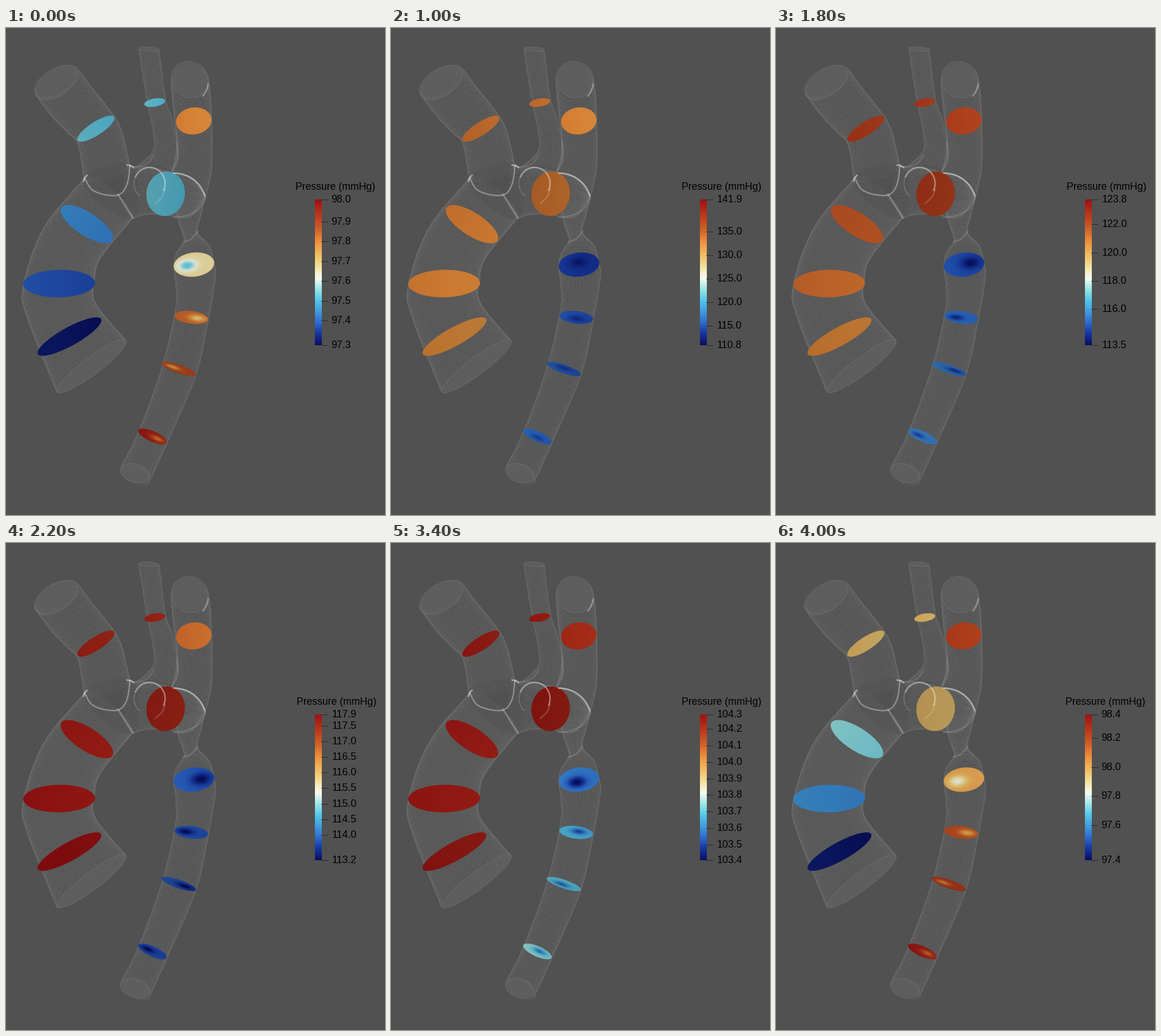
Write a matplotlib script that moves like this. It is 660x849 px and loops after 4200 ms.

```python
import math
import numpy as np
import matplotlib.pyplot as plt
from matplotlib.animation import FuncAnimation
from matplotlib.colors import LinearSegmentedColormap
from matplotlib.patches import Ellipse

W, H, DPI = 660, 849, 100
FRAMES, INTERVAL = 21, 200
PX = 72 / DPI
GREY = 82
BAR_TOP, BAR_BOTTOM = 299, 553
rng = np.random.default_rng(4)

bar_map = LinearSegmentedColormap.from_list("bar", [
    (0, "#080f64"), (.09, "#193ca5"), (.15, "#2d69cd"), (.23, "#419bdc"),
    (.31, "#55c8eb"), (.385, "#9be6e4"), (.457, "#f5faf5"), (.5, "#f5f0c8"),
    (.575, "#f0d27d"), (.71, "#ee913c"), (.8, "#cd5f28"), (.9, "#b9371b"),
    (1, "#a01014")], 512)


class Curve:
    """Value over time through a few (frame, value) points."""

    def __init__(self, *points):
        self.times, self.values = zip(*points)

    def __call__(self, n):
        return np.interp(n, self.times, self.values)


low_pressure = Curve((0, 97.275), (3, 107.94), (7, 113.74), (11, 113.19),
                     (14, 108.755), (17, 103.406), (20, 97.36))
high_pressure = Curve((0, 98.013), (3, 141.86), (4, 148), (7, 129.66), (11, 117.86),
                      (14, 110.53), (17, 104.287), (20, 98.362))

# Pressure within the current range, 0 to 1, at five sites of the vessel
root = Curve((0, .02), (3, .98), (7, .42), (11, 1), (14, .9), (17, .97), (20, .02))
arch = Curve((0, .33), (3, .68), (11, .94), (17, .96), (20, .6))
branch = Curve((0, .71), (3, .46), (7, .96), (11, .76), (14, .97), (20, .87))
narrow = Curve((0, .54), (3, .06), (17, .19), (20, .66))
outlet = Curve((0, .96), (3, .02), (7, .3), (11, .12), (17, .38), (20, .97))

upstroke = Curve((0, 0), (1, 2.2), (3, 3), (20, 20))
swirl = Curve((0, .22), (3, .03), (14, .18), (20, .2))

# Slices: centre, half axes, angle, the two sites they lie between, fraction
SLICES = [(110.5, 538, 63, 16, -29, root, arch, 0), (92.5, 445.5, 62.5, 24, -1, root, arch, .33),
          (141, 342, 53, 20, 33, root, arch, .6), (156.5, 175.5, 38, 11.5, -33, arch, arch, 0),
          (259, 130, 18.5, 7, -10, arch, arch, 0), (278, 289, 33.5, 39, 8, arch, arch, 0),
          (327, 162, 31, 23.5, -8, branch, branch, 0), (327.3, 412.5, 35.5, 21, -7, narrow, outlet, 0),
          (322.5, 504.5, 29.5, 11, 7, narrow, outlet, .55), (301, 594.5, 31.5, 7.5, 19, narrow, outlet, .75),
          (255, 712, 27, 9, 24, narrow, outlet, 1)]


def smooth(points, n):
    """Catmull-Rom curve, sampled evenly along its length."""
    p = np.array(points, float)
    p = np.vstack([2 * p[0] - p[1], p, 2 * p[-1] - p[-2]])
    t = np.linspace(0, 1, 30)[:, None]
    parts = []
    for a, b, c, d in zip(p, p[1:], p[2:], p[3:]):
        parts.append(.5 * (2 * b + (c - a) * t + (2 * a - 5 * b + 4 * c - d) * t**2
                           + (3 * b - a - 3 * c + d) * t**3))
    q = np.vstack(parts)
    s = np.r_[0, np.cumsum(np.hypot(*np.diff(q, axis=0).T))]
    at = np.linspace(0, s[-1], n)
    return np.c_[np.interp(at, s, q[:, 0]), np.interp(at, s, q[:, 1])]


def arc(cx, cy, a, b, start, end):
    t = np.radians(np.linspace(start, end, 60))
    return np.c_[cx + a * np.cos(t), cy + b * np.sin(t)]


glow = np.zeros((H, W))


def splat(a, b, strength):
    """Add the straight lines a-b to the glow image."""
    t = (np.arange(8) + .5)[:, None, None] / 8
    p = (a + (b - a) * t).reshape(-1, 2) - .5
    weight = np.tile(np.hypot(*(b - a).T) / 8 * strength, 8)
    cell = np.floor(p).astype(int)
    f = p - cell
    for dx in (0, 1):
        for dy in (0, 1):
            part = weight * abs(1 - dx - f[:, 0]) * abs(1 - dy - f[:, 1])
            np.add.at(glow, (np.clip(cell[:, 1] + dy, 0, H - 1),
                             np.clip(cell[:, 0] + dx, 0, W - 1)), part)


def tube(left, right, tilt0, tilt1, step=4.6):
    """Triangle mesh around a round vessel between two side curves."""
    length = np.hypot(*np.diff(smooth(left, 60), axis=0).T).sum()
    n = int(length / step)
    lo, hi = smooth(left, n), smooth(right, n)
    mid, half = (lo + hi) / 2, (hi - lo) / 2
    m = int(2 * math.pi * np.hypot(*half.T).mean() / step)
    angle = 2 * math.pi * (np.arange(m) + .5 * (np.arange(n)[:, None] % 2)) / m
    angle = (angle + rng.normal(0, .8 / m, (n, m)))[..., None]
    side = np.c_[-half[:, 1], half[:, 0]] * np.linspace(tilt0, tilt1, n)[:, None]
    v = mid[:, None] + half[:, None] * np.cos(angle) + side[:, None] * np.sin(angle)
    v += rng.normal(0, .3, v.shape)
    ahead = np.roll(v, -1, axis=1)
    odd = (np.arange(n - 1) % 2 == 1)[:, None, None]
    diagonal = np.where(odd, ahead[:-1], v[:-1])
    other = np.where(odd, v[1:], ahead[1:])
    for a, b in ((v, ahead), (v[:-1], v[1:]), (diagonal, other)):
        splat(a.reshape(-1, 2), b.reshape(-1, 2), 4.2)
    for edge in (lo, hi):
        splat(edge[:-1], edge[1:], 9)


def cap(cx, cy, a, b, degrees):
    """Open vessel end: lighter ellipse with a rim."""
    c, s = math.cos(math.radians(degrees)), math.sin(math.radians(degrees))
    rim = arc(0, 0, a, b, 0, 360) @ np.array([[c, s], [-s, c]]) + (cx, cy)
    splat(rim[:-1], rim[1:], 22)
    yy, xx = np.mgrid[:H, :W] + .5
    u = ((xx - cx) * c + (yy - cy) * s) / a
    v = ((yy - cy) * c - (xx - cx) * s) / b
    glow[u * u + v * v < 1] += 10


# Left branch, thin branch, right branch
tube([(50, 113), (75, 148), (105, 180), (125, 202), (136, 262)],
     [(125, 71), (150, 105), (176, 137), (200, 175), (216, 240)], .5, .3)
tube([(231, 37), (245, 125), (256, 180), (256, 215), (226, 245)],
     [(267, 39), (278, 125), (290, 160), (300, 215), (289, 250)], .2, .3)
tube([(287, 90), (290, 120), (298, 200), (290, 250)],
     [(353, 95), (357, 140), (358, 240), (348, 292)], .9, .3)
# Ascending part, arch, descending part
tube([(136, 262), (65, 350), (30, 450), (37, 505), (88, 634)],
     [(220, 332), (165, 400), (154, 440), (156, 480), (209, 545)], .3, .22)
tube([(216, 241), (250, 243), (290, 252), (320, 260), (347, 290)],
     [(220, 332), (245, 325), (280, 326), (318, 330), (347, 296)], .3, .3)
tube([(290, 292), (299, 332), (310, 366), (308, 376), (296, 394), (292, 415), (296, 450),
      (295, 490), (272, 590), (230, 705), (200, 765)],
     [(347, 293), (340, 325), (333, 350), (336, 362), (355, 382), (362, 410), (365, 435),
      (352, 512), (331, 605), (280, 725), (249, 793)], .3, .5)
cap(87.5, 95, 42, 23, -33)
cap(249, 37, 18, 4, 4)
cap(320, 90, 33, 31, 35)
cap(148.5, 589.5, 75, 15, -37)
cap(224.5, 776, 26, 16, 18)

fig = plt.figure(figsize=(W / DPI, H / DPI), dpi=DPI, facecolor="#525252")
ax = fig.add_axes([0, 0, 1, 1])
ax.axis("off")
mesh = (GREY + 42 * (1 - np.exp(-glow / 42))) / 255
ax.imshow(mesh, cmap="gray", vmin=0, vmax=1, extent=(0, W, H, 0),
          interpolation="nearest", aspect="auto", zorder=0)


class Slice:
    """Coloured cross section of a vessel."""

    def __init__(self, index, cx, cy, a, b, degrees, near, far, fraction):
        self.index, self.near, self.far, self.fraction = index, near, far, fraction
        c, s = math.cos(math.radians(degrees)), math.sin(math.radians(degrees))
        hw, hh = math.hypot(a * c, b * s) + 1, math.hypot(a * s, b * c) + 1
        ys, xs = np.mgrid[-1:1:90j, -1:1:90j]
        self.u = (xs * hw * c + ys * hh * s) / a
        self.v = (ys * hh * c - xs * hw * s) / b
        # a slice seen edge-on gets less light, one standing upright even less
        shade = min(.9, .66 + .5 * b / a) * (.84 if b > a else 1)
        colours = bar_map(np.linspace(0, 1, 512))[:, :3] * shade
        cmap = LinearSegmentedColormap.from_list("slice", colours, 512)
        self.image = ax.imshow(xs, cmap=cmap, vmin=0, vmax=1, aspect="auto", zorder=2,
                               extent=(cx - hw, cx + hw, cy + hh, cy - hh),
                               interpolation="bilinear")
        self.image.set_clip_path(Ellipse((cx, cy), 2 * a, 2 * b, angle=degrees,
                                         transform=ax.transData))

    def draw(self, n):
        t = upstroke(n)
        field = self.near(t) * (1 - self.fraction) + self.far(t) * self.fraction - .012 * self.u
        if self.near is narrow:
            turn = 2 * math.pi * n / FRAMES + math.pi * self.index
            x, y = .35 * math.cos(turn), .2 * math.sin(turn)
            field -= swirl(n) * np.exp(-((self.u - x)**2 + (self.v - y)**2) / .2)
        self.image.set_data(np.clip(field, 0, 1))


slices = [Slice(i, *spec) for i, spec in enumerate(SLICES)]


def seam(points, alpha, width=1.3):
    """Bright join between vessels: a thin core in a soft halo."""
    for w, strength in ((width, alpha), (width + 2.5, alpha * .25)):
        ax.plot(*np.transpose(points), color="white", alpha=strength, lw=w * PX, zorder=3)


seam(smooth([(137, 262), (150, 282), (175, 291), (198, 290), (211, 272), (216, 240)], 60), .4)
seam(smooth([(135, 267), (137, 261), (141, 257)], 20), .5, 1.8)
seam(smooth([(211, 239), (217, 240), (222, 243)], 20), .5, 1.8)
seam(smooth([(195, 290), (209, 312), (221, 331)], 40), .25, 2.2)
seam(arc(250, 271, 27, 28, 205, 385), .5)
seam(arc(250, 271, 27, 28, 130, 205), .15)
seam(arc(292, 306, 56, 53, 270, 345), .55, 1.6)
seam(arc(292, 293, 55, 37, 0, 90), .15)
seam(smooth([(260, 306), (272, 294), (277, 281)], 30), .2)
seam(arc(320, 95, 32, 33, 5, 45), .4)
seam(smooth([(222, 243), (245, 237), (257, 222)], 30), .13)
seam(smooth([(289, 250), (299, 230), (298, 200)], 30), .13)
seam(smooth([(309, 373), (322, 368), (334, 355)], 30), .18)

ax.imshow(np.linspace(1, 0, 256)[:, None], cmap=bar_map, aspect="auto", zorder=2,
          extent=(538, 550, BAR_BOTTOM, BAR_TOP), interpolation="bilinear")
font = dict(family="Liberation Sans", size=17.6 * PX, color="black", va="baseline")
title = ax.text(504, 281.5, "Pressure (mmHg)", **font)
ticks = [(ax.plot([549, 560], [0, 0], color="#252525", lw=.9 * PX, zorder=4)[0],
          ax.text(566, 0, "", **font)) for _ in range(14)]
ax.set(xlim=(0, W), ylim=(H, 0))


def tick_step(span):
    """Smallest 1-2-5 step with fewer than ten divisions."""
    return min(k * 10.0**e for e in range(-2, 3) for k in (1, 2, 5)
               if span / (k * 10.0**e) < 10)


def draw_scale(low, high):
    def to_y(value):
        return BAR_BOTTOM - (value - low) / (high - low) * (BAR_BOTTOM - BAR_TOP)

    step = tick_step(high - low)
    inner = np.arange(math.ceil(low / step), math.floor(high / step) + 1) * step
    values = [low, high] + [v for v in inner if BAR_TOP + 17.5 < to_y(v) < BAR_BOTTOM - 18]
    shift = 2 if high >= 100 else 0
    title.set_x(504 + shift)
    for i, (line, label) in enumerate(ticks):
        shown = i < len(values)
        line.set_visible(shown)
        label.set_visible(shown)
        if shown:
            y = to_y(values[i])
            line.set_ydata([y, y])
            label.set_position((566 + shift, y + 5))
            label.set_text(f"{values[i]:.1f}")


def update(n):
    draw_scale(low_pressure(n), high_pressure(n))
    for item in slices:
        item.draw(n)
    return []


anim = FuncAnimation(fig, update, frames=FRAMES, interval=INTERVAL,
                     init_func=lambda: update(0), repeat=True, repeat_delay=0, blit=False)
plt.show()
```
